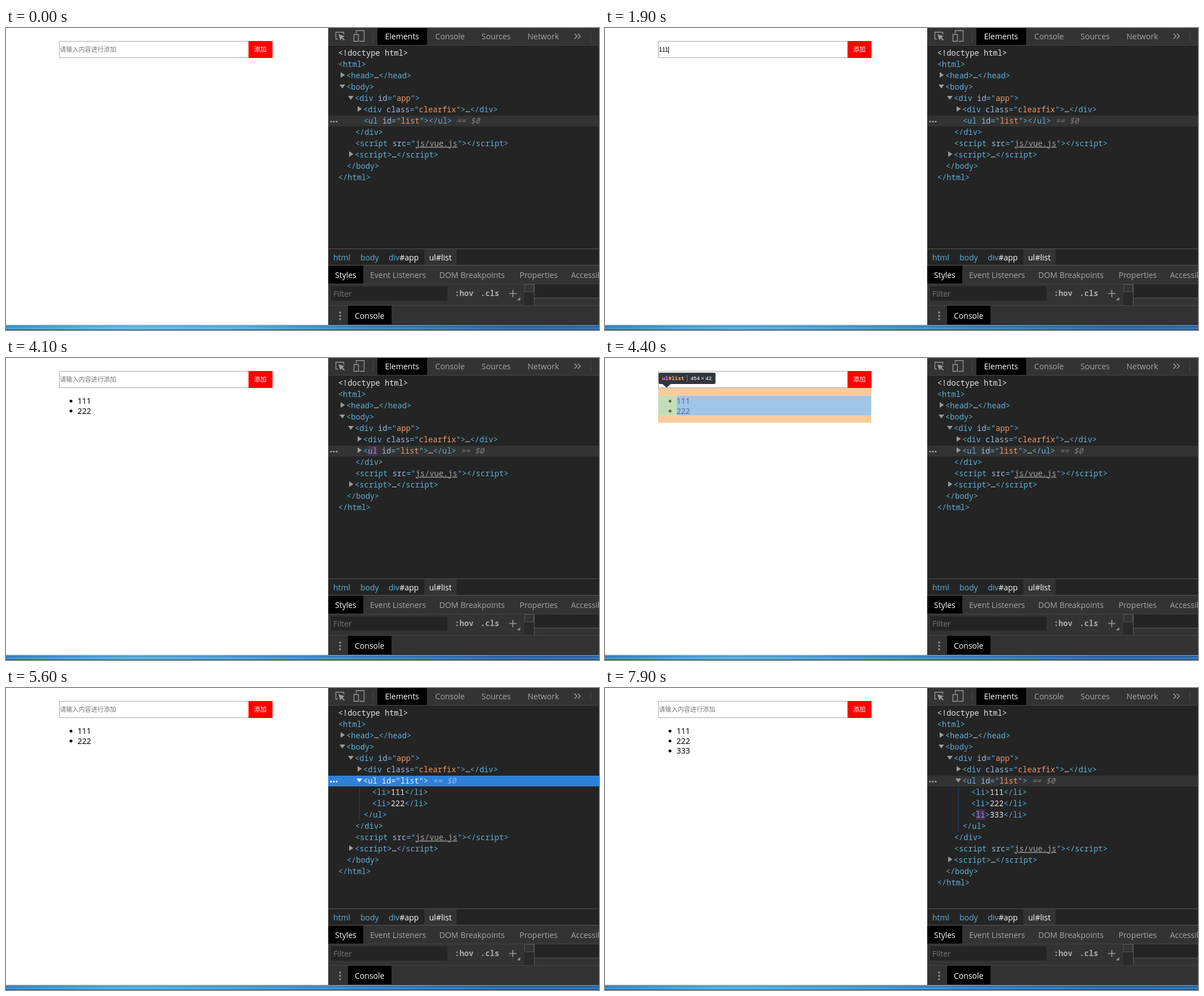
Write an HTML page that moves like this. It is 1049 px wide and 534 px high and loops after 8000 ms.

```html
<!DOCTYPE html>
<html lang="zh">
<head>
<meta charset="utf-8">
<title>List demo</title>
<style>
  html, body { margin: 0; width: 100%; height: 100%; overflow: hidden; background: #fff; }
  svg { display: block; width: 1049px; height: 534px; }
  text { white-space: pre; }
  .ui { font: 14px "Open Sans", sans-serif; fill: #a6a6a6; }
  .ui .on { fill: #fff; }
  .ui .tag, .tree { fill: #5db0d7; }
  .mono, .tree { font: 13.7px "Noto Sans Mono", monospace; }
  .bold { font-weight: 700; fill: #ababab; }
  .a { fill: #9bbbdc; }
  .v { fill: #f29766; }
  .t { fill: #e4e4e4; }
  .link { fill: #a5a5a5; text-decoration: underline; }
  .ref { fill: #808080; font-style: italic; }
  .active, .active .a, .active .v, .active .t { fill: #e9f1fb; }
  .active .ref { fill: #94b9e4; }
  .form { font: 11.07px "Liberation Sans", "Noto Sans CJK SC", sans-serif; }
  .button { font-weight: 500; fill: #fff; }
  .list { font: 14px "Noto Sans", sans-serif; }
  .tip { font: bold 9.3px "Noto Sans Mono", monospace; }
  .size { font: 600 9.4px "Open Sans", sans-serif; fill: #e3e3e3; }
  .icon { fill: none; stroke: #9a9a9a; stroke-width: 1.3; }
</style>
</head>
<body>
<svg viewBox="0 0 1049 534">
  <defs>
    <linearGradient id="bar">
      <stop offset="0" stop-color="#1c78c0"/>
      <stop offset=".12" stop-color="#35a6dc"/>
      <stop offset=".22" stop-color="#52bce6"/>
      <stop offset=".4" stop-color="#3a9fd8"/>
      <stop offset=".62" stop-color="#1c6cb8"/>
      <stop offset=".86" stop-color="#0d4288"/>
      <stop offset="1" stop-color="#0e4a92"/>
    </linearGradient>
    <linearGradient id="shine" x2="0" y2="1">
      <stop offset="0" stop-color="#0a2d55" stop-opacity=".6"/>
      <stop offset=".15" stop-color="#d5f2ff" stop-opacity=".6"/>
      <stop offset=".32" stop-color="#0a3a78" stop-opacity=".4"/>
      <stop offset=".6" stop-color="#9fe2ff" stop-opacity=".4"/>
      <stop offset="1" stop-color="#06336e" stop-opacity=".6"/>
    </linearGradient>
    <linearGradient id="glow">
      <stop offset="0" stop-color="#30c8ff" stop-opacity=".3"/>
      <stop offset=".2" stop-color="#60e0ff" stop-opacity=".6"/>
      <stop offset=".4" stop-color="#60e0ff" stop-opacity=".5"/>
      <stop offset=".6" stop-color="#30a8ff" stop-opacity="0"/>
    </linearGradient>
  </defs>

  <rect width="1049" height="534" fill="#fff"/>
  <rect x="94.5" y="23.5" width="376" height="29" fill="#fff" stroke="#a9a9a9"/>
  <rect x="429" y="23" width="42.5" height="30" fill="#f00"/>
  <text class="form button" x="438.7" y="42.3">添加</text>
  <text class="form" id="field" x="95.3" y="42.3"></text>
  <path id="caret" d="M.5 33v12" stroke="#000"/>
  <g id="items" class="list"></g>
  <g id="overlay"></g>

  <rect x="570" width="479" height="525" fill="#242424"/>
  <rect x="570" width="479" height="30" fill="#333"/>
  <rect id="hover" x="827" width="81" height="30" fill="#3d3d3d"/>
  <path d="M570 30.5h479M570 452.5h479M570 490.5h479" stroke="#454545"/>
  <path d="M570 390.5h479M570 419.5h479" stroke="#575757"/>
  <rect x="657" width="88" height="30"/>
  <path d="M649.5 5v20M1034.5 5v20" stroke="#4a4a4a"/>
  <g class="icon">
    <path d="M587 19.500h-3.500v-12h14v4"/>
    <path d="M588 11l3.500 11 2.200-3.800 4 4 1.500-1.500-4-4 3.800-2.200z" fill="#9a9a9a" stroke="none"/>
    <path d="M619.500 9.500v-5h14v19h-8M615.500 11.500h8v12h-8z"/>
    <path d="M1005.500 10l4.500 4.500-4.500 4.500M1011.500 10l4.500 4.500-4.500 4.500" stroke-width="1.6"/>
  </g>
  <g class="ui">
    <text class="on" x="670.500" y="20">Elements</text>
    <text x="759.300" y="20">Console</text>
    <text id="sources" x="841.300" y="20">Sources</text>
    <text x="922.500" y="20">Network</text>
  </g>

  <g id="tree" class="tree"></g>

  <rect x="740" y="391" width="57" height="28" fill="#333"/>
  <rect x="570" y="420" width="479" height="32" fill="#333"/>
  <rect x="570" y="420" width="62" height="32"/>
  <rect x="570" y="453" width="347" height="37" fill="#333"/>
  <rect x="575" y="457" width="206" height="25" fill="#242424"/>
  <rect x="917" y="453" width="17" height="37" fill="#292929"/>
  <rect x="917.500" y="453.500" width="16" height="13" fill="#333" stroke="#555"/>
  <path d="M934.500 453v37M935 477.500h114" stroke="#5a5a5a"/>
  <rect x="935" y="478" width="114" height="12" fill="#333"/>
  <rect x="570" y="491" width="479" height="34" fill="#333"/>
  <rect x="605" y="491" width="77" height="33"/>
  <g class="ui">
    <text class="tag" x="579" y="411">html</text>
    <text class="tag" x="627" y="411">body</text>
    <text class="tag" x="677" y="411">div<tspan class="on">#app</tspan></text>
    <text class="on" x="748.500" y="411">ul#list</text>
    <text class="on" x="582" y="441.500">Styles</text>
    <text x="644" y="441.500">Event Listeners</text>
    <text x="766.500" y="441.500">DOM Breakpoints</text>
    <text x="908.500" y="441.500">Properties</text>
    <text x="999.500" y="441.500">Accessibility</text>
    <text x="579" y="474.500" fill="#757575">Filter</text>
    <text class="on" x="617" y="514">Console</text>
  </g>
  <text class="mono bold" x="794" y="474">:hov</text>
  <text class="mono bold" x="839.500" y="474">.cls</text>
  <path d="M890 469.500h13M896.500 463v13" stroke="#9a9a9a" stroke-width="1.700"/>
  <path d="M909.500 476v5.500h-5.500z" fill="#9a9a9a"/>
  <g fill="#9a9a9a">
    <circle cx="591" cy="503" r="1.700"/><circle cx="591" cy="509" r="1.700"/><circle cx="591" cy="515" r="1.700"/>
  </g>

  <rect y="525" width="1049" height="9" fill="url(#bar)"/>
  <rect id="barGlow" y="526" width="1049" height="7" fill="url(#glow)"/>
  <rect y="525" width="1049" height="9" fill="url(#shine)"/>
  <g id="ime">
    <rect x="1033" y="505" width="24" height="24" rx="4" fill="#222"/>
    <text x="1040" y="521.500" fill="#fff" style="font: 13px 'Noto Sans CJK SC', sans-serif">中</text>
  </g>
</svg>
<script>
const LOOP = 8000, FADE = 1400;
const $ = id => document.getElementById(id);

// Each track is a list of [start time, value] steps.
const at = (track, t) => track.findLast(([start]) => start <= t)[1];
const typed = [[0, ''], [1200, '1'], [1300, '11'], [1500, '111'], [2000, ''],
  [2600, '2'], [2700, '22'], [2800, '222'], [3700, ''],
  [6500, '3'], [6700, '33'], [6800, '333'], [7600, '']];
const caretOn = [[0, false], [600, true], [2000, false], [2400, true], [3200, false], [6200, true], [7300, false]];
const imeOn = [[0, false], [700, true], [1900, false], [2400, true], [3600, false], [6200, true], [7500, false]];
const added = [[2000, '111'], [3700, '222'], [7600, '333']];
const inspected = [[0, null], [4200, 'app'], [4400, 'ul'], [5600, null]];
const focused = [[0, false], [5000, true], [6200, false]];
const expanded = [[0, false], [5200, true]];

const show = (id, on) => $(id).setAttribute('visibility', on ? 'visible' : 'hidden');
const span = (cls, s) => `<tspan class="${cls}">${s}</tspan>`;
const rect = (x, y, w, h, fill, extra = '') =>
  `<rect x="${x}" y="${y}" width="${w}" height="${h}" fill="${fill}" ${extra}/>`;
const open = (name, attr, value) =>
  `&lt;${name}${attr ? ` ${span('a', attr)}="${value}"` : ''}&gt;`;
const close = name => `&lt;/${name}&gt;`;
const dots = span('t', '…');

function treeRows(items, t) {
  const isOpen = at(expanded, t);
  const ul = open('ul', 'id', span('v', 'list'));
  const ref = span('ref', ' == $0');
  const rows = [
    [0, '', span('t', '&lt;!doctype html&gt;')],
    [0, '', open('html')],
    [1, 'right', open('head') + dots + close('head')],
    [1, 'down', open('body')],
    [2, 'down', open('div', 'id', span('v', 'app'))],
    [3, 'right', open('div', 'class', span('v', 'clearfix')) + dots + close('div')],
  ];
  if (isOpen) {
    rows.push([3, 'down', ul + ref]);
    for (const s of items) rows.push([4, '', open('li') + span('t', s) + close('li')]);
    rows.push([3, '', close('ul')]);
  } else {
    rows.push([3, items.length ? 'right' : '', ul + (items.length ? dots : '') + close('ul') + ref]);
  }
  rows.push(
    [2, '', close('div')],
    [2, '', open('script', 'src', span('link', 'js/vue.js')) + close('script')],
    [2, 'right', open('script') + dots + close('script')],
    [1, '', close('body')],
    [0, '', close('html')]);
  return rows;
}

function drawTree(items, t) {
  const focus = at(focused, t), isOpen = at(expanded, t);
  let out = rect(570, 155, 479, 19, focus ? '#2f80d8' : '#333');
  for (const x of [575, 580, 585])
    out += `<circle cx="${x}" cy="165.500" r="1.600" fill="${focus ? '#fff' : '#a5a5a5'}"/>`;
  if (isOpen) out += rect(624.5, 175, 1.5, 20 * items.length + 19, '#1b3a66');

  // A changed node's tag name flashes purple and fades.
  const last = added.findLast(([start]) => start <= t);
  const glow = last ? Math.max(0, 1 - (t - last[0]) / FADE) ** 4 : 0;
  if (glow > .004) {
    const [x, y] = isOpen ? [656, 175 + 20 * items.length - 20] : [640, 155];
    out += rect(x, y, 16.5, 18, '#9e3699', `rx="2" opacity="${glow}"`);
  }

  treeRows(items, t).forEach(([depth, arrow, html], i) => {
    const x = 587.5 + 15 * depth + (arrow ? -.5 : .3), y = 49 + 20 * i;
    const active = focus && i === 6;
    const fill = active ? '#e0e9f5' : '#9a9a9a';
    if (arrow === 'right') out += `<path d="M${x - 10} ${y - 11}v10l7.500 -5z" fill="${fill}"/>`;
    if (arrow === 'down') out += `<path d="M${x - 12} ${y - 9}h10l-5 7z" fill="${fill}"/>`;
    out += `<text x="${x}" y="${y}" class="${active ? 'active' : ''}">${html}</text>`;
  });
  $('tree').innerHTML = out;
}

function tooltip(y, arrow, name, id, size) {
  return rect(95, y, 100.5, 20, '#33363f', 'rx="2"') +
    `<path d="${arrow}" fill="#33363f"/><path d="M145.500 ${y + 4}v12" stroke="#777"/>` +
    `<text class="tip" x="101" y="${y + 13.3}" fill="#ee78e6">${name}<tspan fill="#ffab66">#${id}</tspan></text>` +
    `<text class="size" x="151.500" y="${y + 13.3}">${size}</text>`;
}

const overlays = {
  app: rect(94, 23, 377, 78.5, 'rgba(111,168,220,.66)') +
    tooltip(109, 'M101 109.500l8 -7 8 7z', 'div', 'app', '454 × 94'),
  ul: `<path d="M94 53h377v61.500H94zM94 67v34.500h377V67z" fill-rule="evenodd" fill="rgba(246,178,107,.66)"/>` +
    rect(94, 67, 33, 34.5, 'rgba(147,196,125,.55)') +
    rect(127, 67, 344, 34.5, 'rgba(111,168,220,.66)') +
    tooltip(26, 'M101 45.500l8 7 8 -7z', 'ul', 'list', '454 × 42'),
};

function render(t) {
  const text = at(typed, t), field = $('field');
  field.textContent = text || '请输入内容进行添加';
  field.setAttribute('fill', text ? '#000' : '#757575');
  const width = text ? field.getComputedTextLength() : 0;
  $('caret').setAttribute('transform', `translate(${Math.round(95.6 + width)})`);
  show('caret', at(caretOn, t));
  show('ime', at(imeOn, t));
  show('barGlow', t < 600);

  const hovering = t >= 100 && t < 200;
  show('hover', hovering);
  $('sources').setAttribute('class', hovering ? 'on' : '');

  const items = added.filter(([start]) => start <= t).map(([, s]) => s);
  $('items').innerHTML = items.map((s, i) =>
    `<circle cx="115" cy="${76.3 + 17.5 * i}" r="2.500"/><text x="126.500" y="${81 + 17.5 * i}">${s}</text>`).join('');
  $('overlay').innerHTML = overlays[at(inspected, t)] || '';
  drawTree(items, t);
}

const start = performance.now();
let shown = -1;
function tick() {
  const t = Math.floor((performance.now() - start) % LOOP / 100) * 100;
  if (t !== shown) render(shown = t);
  requestAnimationFrame(tick);
}
tick();
</script>
</body>
</html>
```
